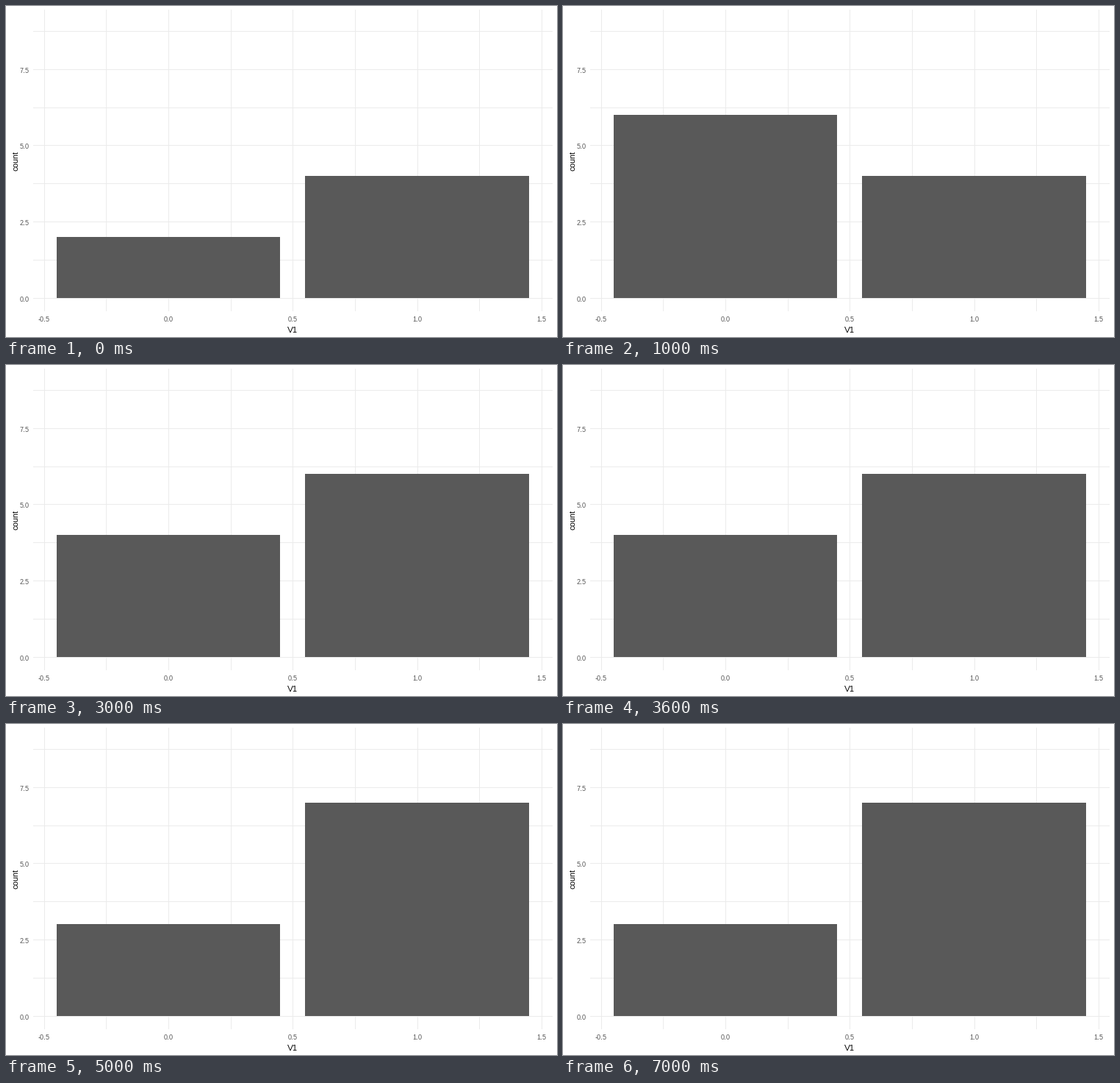
Animation of 750x450 px, one loop 8 s. Source, as a matplotlib script:

```python
import matplotlib.pyplot as plt
import numpy as np
from matplotlib.animation import FuncAnimation
from matplotlib.patches import Rectangle

WIDTH, HEIGHT, DPI = 750, 450, 75
LEFT, RIGHT, TOP, BOTTOM = 37, 744, 5, 415
GRID, BAR, TICK_TEXT = "#EBEBEB", "#595959", "#4D4D4D"

# Counts of zeros and ones, one pair per second
COUNTS = [(2, 4), (6, 4), (6, 4), (4, 6), (6, 4), (3, 7), (6, 4), (3, 7)]

plt.rcParams.update({
    "font.family": "Liberation Sans",
    "text.hinting": "no_autohint",
    "text.hinting_factor": 1,
    "toolbar": "None",
})

fig = plt.figure(figsize=(WIDTH / DPI, HEIGHT / DPI), dpi=DPI, facecolor="white")
ax = fig.add_axes([0, 0, 1, 1])
ax.set(xlim=(0, WIDTH), ylim=(HEIGHT, 0))
ax.axis("off")


def to_x(value):
    return round(221.1 + 338.5 * value)


def to_y(count):
    return round(396.63 - 41.43 * count)


def box(x, y, width, height, color):
    return ax.add_patch(Rectangle((x, y), width, height, facecolor=color,
                                  linewidth=0, antialiased=False))


def label(x, y, text, pixels, color, **kwargs):
    kwargs = {"ha": "center", "va": "baseline", **kwargs}
    ax.text(x, y, text, fontsize=pixels * 72 / DPI, color=color, **kwargs)


for value in np.arange(-0.5, 1.6, 0.25):
    box(to_x(value), TOP, 1, BOTTOM - TOP, GRID)
for count in np.arange(0, 9, 1.25):
    box(LEFT, to_y(count), RIGHT - LEFT, 1, GRID)

for value in np.arange(-0.5, 1.6, 0.5):
    label(to_x(value), 429, f"{value:.1f}", 9, TICK_TEXT)
for count in np.arange(0, 8, 2.5):
    label(32, to_y(count) + 5, f"{count:.1f}", 9, TICK_TEXT, ha="right")

label(390, 444, "V1", 11, "black")
label(16, 211, "count", 11, "black", rotation=90, rotation_mode="anchor")

bars = []
for center in (0, 1):
    x0, x1 = to_x(center - 0.45), to_x(center + 0.45)
    bars.append(box(x0, to_y(0), x1 - x0, 0, BAR))


def update(frame):
    for bar, count in zip(bars, COUNTS[frame]):
        bar.set_y(to_y(count))
        bar.set_height(to_y(0) - to_y(count))
    return bars


anim = FuncAnimation(fig, update, frames=len(COUNTS), interval=1000,
                     repeat=True, repeat_delay=0, blit=False)
plt.show()
```
